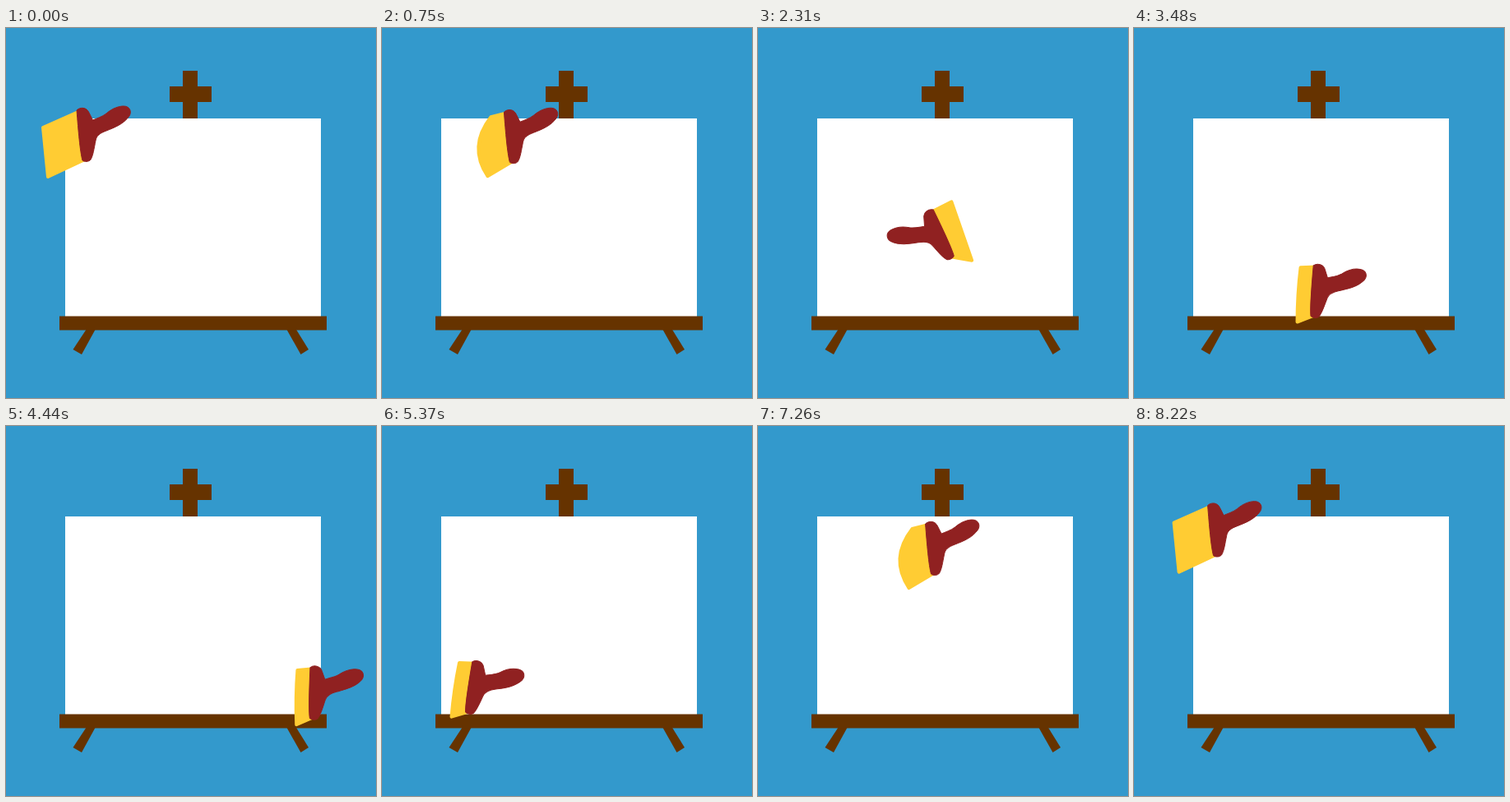
These frames come from a looping animation (450 px wide and 450 px high, 8250 ms). An HTML page:

```html
<!DOCTYPE html>
<html lang="en">
<head>
<meta charset="utf-8">
<title>Easel and brush</title>
<style>
  html, body { margin: 0; width: 100%; height: 100%; overflow: hidden; background: #3399cc; }
  svg { display: block; width: 100vw; height: 100vh; }
  .wood { fill: #663300; }
  #bristles { fill: #ffcc33; stroke: #ffcc33; stroke-width: 4; stroke-linejoin: round; }
  #handle { fill: #902121; stroke: #902121; }
</style>
</head>
<body>
<svg viewBox="0 0 450 450">
  <rect width="450" height="450" fill="#3399cc"/>
  <g class="wood">
    <rect x="215" y="52" width="18" height="58"/>
    <rect x="199" y="71" width="51" height="19"/>
    <path d="M98 366H109L92 397L81.500 391Z"/>
    <path d="M341 366H352.500L368 391L358.500 397Z"/>
  </g>
  <rect x="72" y="110" width="311" height="241" fill="#fff"/>
  <rect class="wood" x="65" y="350.500" width="325" height="17"/>
  <g id="brush">
    <path id="bristles"/>
    <path id="handle" d="M-10 -30C-6 -34 2 -34 5 -27L9.500 -18C14 -20 21 -22 26 -26C34 -33 42 -35 47 -35C55 -35 57 -28 54 -23C47 -13 36 -9 26 -5C18 -2 14 1 13 7C11 17 10 25 7 30C5 33 -1 33 -3 31C-6 20 -8 -5 -10 -30Z"/>
  </g>
</svg>
<script>
const LOOP = 8250, STEP = 30, TURN = 4155;

// Strokes facing right, left, right; Bezier points are [x, y, tilt]
const strokes = [
  { from: 0, to: 1650, flip: 1,
    path: [[96, 130, 0], [116, 106, 0], [171, 146, 0], [404, 200, 0]] },
  { from: 1650, to: 2605, flip: -1,
    path: [[435, 194, -5], [338, 212, -12], [231, 244.5, 48], [115, 291, 36]] },
  { from: 2605, to: 4105, flip: 1,
    path: [[95.5, 320, 18], [93, 316, 12], [208, 319, 8], [501, 329, 6]] }
];

// Outer bristle edge: top x, y, bottom x, y, bulge
const fresh = [-51, -9, -45, 51, 0];
const bowed = [-26, -24, -30, 48, 26];
const thin = [-8, -16, -10, 40, 4];
const flat = [-34, -27, -19, 47, 0];
const soft = [-25, -25, -18, 41, 2];
const cues = [[90, fresh], [700, bowed], [1380, bowed], [1640, thin],
              [1830, thin], [2310, flat], [2940, soft]];

const [brush, bristles, handle] =
  ["brush", "bristles", "handle"].map(id => document.getElementById(id));

const mix = (a, b, u) => a.map((v, i) => v + (b[i] - v) * u);

// Point on a Bezier curve by repeated mixing
function along(points, u) {
  while (points.length > 1)
    points = points.slice(1).map((p, i) => mix(points[i], p, u));
  return points[0];
}

function edgeAt(t) {
  const next = cues.findIndex(cue => cue[0] > t);
  if (next < 0) return soft;
  if (next === 0) return fresh;
  const [t0, a] = cues[next - 1], [t1, b] = cues[next];
  return mix(a, b, (t - t0) / (t1 - t0));
}

function draw() {
  const t = Math.floor(performance.now() % LOOP / STEP) * STEP;
  const s = t <= TURN ? t : 2 * TURN - t;
  const { from, to, flip, path } = strokes.findLast(stroke => s >= stroke.from);
  const [x, y, tilt] = along(path, (s - from) / (to - from));
  const [x1, y1, x2, y2, bulge] = edgeAt(s);
  brush.setAttribute("transform", `translate(${x} ${y}) scale(${flip} 1) rotate(${tilt})`);
  bristles.setAttribute("d", `M-6 -29L${x1} ${y1}
    Q${(x1 + x2) / 2 - bulge} ${(y1 + y2) / 2} ${x2} ${y2}L2 29Z`);
  requestAnimationFrame(draw);
}
draw();
</script>
</body>
</html>
```
